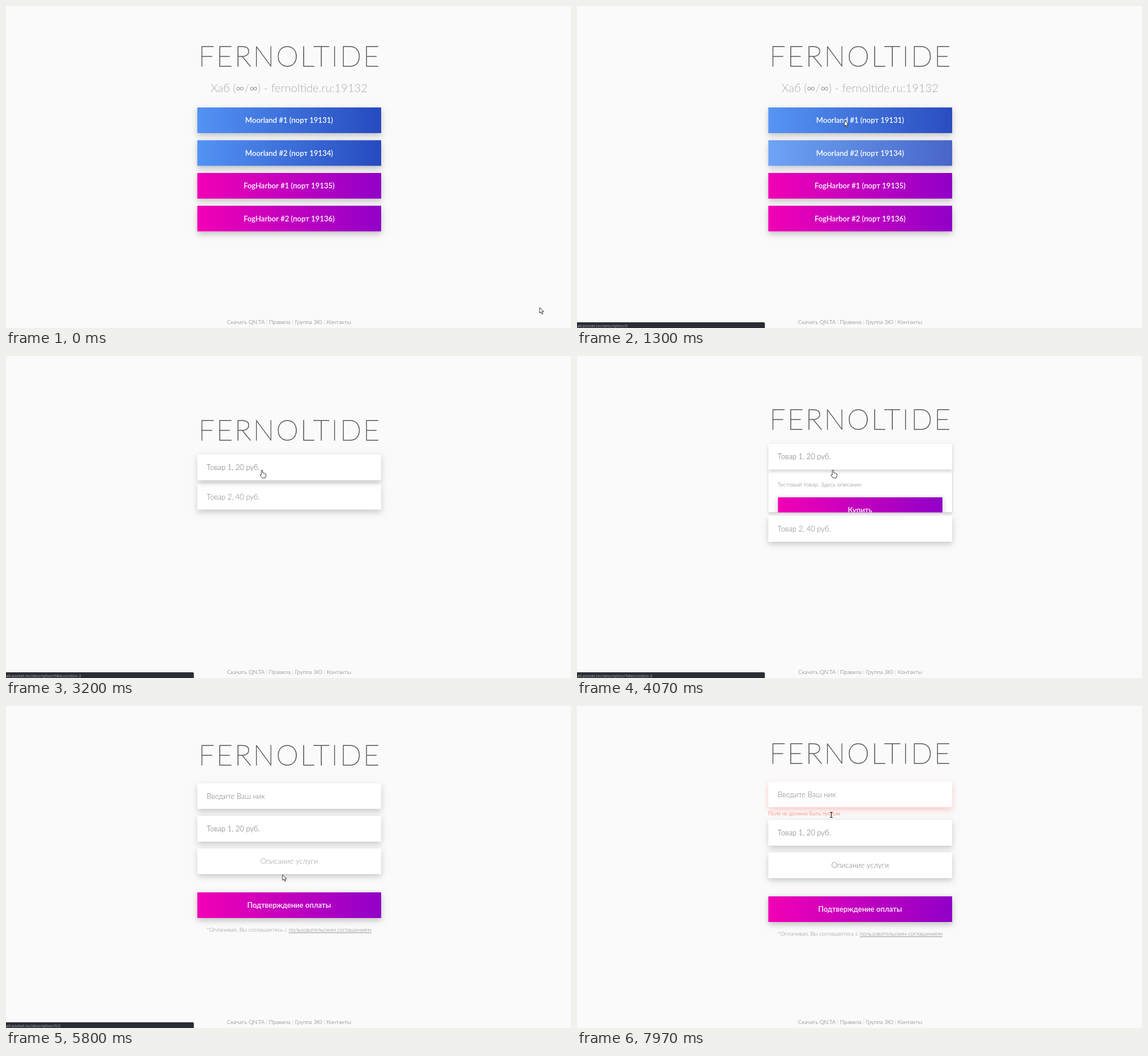
These frames come from a looping animation (991x565 px, 8 s). An HTML page with a canvas:

```html
<!DOCTYPE html>
<html lang="ru">
<head>
<meta charset="utf-8">
<style>
html, body { margin: 0; width: 100%; height: 100%; overflow: hidden; background: #fafafa; }
canvas { display: block; width: 991px; height: 565px; }
</style>
</head>
<body>
<canvas id="stage" width="991" height="565"></canvas>
<script>
const ctx = document.getElementById('stage').getContext('2d');
const LOOP = 8000, LEFT = 335.5, WIDTH = 322.5, HEIGHT = 45, MID = 496.5;
const FONT = "Lato, 'Open Sans', sans-serif";
const BLUE = ['#5393f4', '#264abf'], PINK = ['#f200b5', '#9100c8'];
const BRAND = 'FERNOLTIDE';

const clamp = v => Math.max(0, Math.min(1, v));
const smooth = v => v * v * (3 - 2 * v);
const ramp = (t, start, length) => clamp((t - start) / length);

// Each span is [enter, leave]; the highlight fades both ways.
const hover = (t, spans) =>
  spans.reduce((sum, [a, b]) => sum + ramp(t, a, 260) - ramp(t, b, 260), 0);

function text(str, x, y, size, color, weight = 300, align = 'left') {
  ctx.font = `${weight} ${size}px ${FONT}`;
  ctx.textAlign = align;
  ctx.fillStyle = color;
  ctx.fillText(str, x, y);
}

function runs(parts, y, size) {
  ctx.font = `300 ${size}px ${FONT}`;
  const widths = parts.map(p => ctx.measureText(p[0]).width);
  let x = MID - widths.reduce((a, b) => a + b) / 2;
  parts.forEach(([str, color, underline], i) => {
    text(str, x, y, size, color);
    if (underline) ctx.fillRect(x, y + 1.5, widths[i], 0.8);
    x += widths[i];
  });
}

function box(x, y, w, h, fill, shadow, blur = 10, drop = 4) {
  ctx.save();
  ctx.shadowColor = shadow;
  ctx.shadowBlur = blur;
  ctx.shadowOffsetY = drop;
  ctx.fillStyle = fill;
  ctx.fillRect(x, y, w, h);
  ctx.restore();
}

function button(label, y, colors, lit, x = LEFT, w = WIDTH) {
  const fill = ctx.createLinearGradient(x, y, x + w, y);
  colors.forEach((c, i) => fill.addColorStop(i, c));
  box(x, y, w, HEIGHT, '#fafafa', `rgba(0,0,0,${0.24 - 0.05 * lit})`);
  ctx.globalAlpha = 1 - 0.18 * lit;
  ctx.fillStyle = fill;
  ctx.fillRect(x, y, w, HEIGHT);
  ctx.globalAlpha = 1;
  text(label, MID, y + 27, 13, '#fff', 600, 'center');
}

function card(label, y, { center = false, color = '#777', shadow = 'rgba(0,0,0,.2)', blur, drop } = {}) {
  box(LEFT, y, WIDTH, HEIGHT, '#fff', shadow, blur, drop);
  text(label, center ? MID : 352, y + 27, 13, color, 300, center ? 'center' : 'left');
}

function title(baseline) {
  ctx.letterSpacing = '3px';
  text(BRAND, MID + 1.5, baseline, 50, '#555', 100, 'center');
  ctx.strokeStyle = '#555';
  ctx.lineWidth = 0.8;
  ctx.strokeText(BRAND, MID + 1.5, baseline);
  ctx.letterSpacing = '0px';
}

function hub(t) {
  title(106);
  runs([['Хаб (', '#aaa'], ['∞', '#777'], ['/', '#aaa'], ['∞', '#777'],
    [`) - ${BRAND.toLowerCase()}.ru:19132`, '#aaa']], 151, 20);
  button('Moorland #1 (порт 19131)', 178, BLUE, hover(t, [[1275, 1720]]));
  button('Moorland #2 (порт 19134)', 235.5, BLUE, hover(t, [[700, 1270], [1740, 2010]]));
  button('FogHarbor #1 (порт 19135)', 293, PINK, hover(t, [[540, 680], [2040, 2260]]));
  button('FogHarbor #2 (порт 19136)', 350.5, PINK, hover(t, [[430, 520], [2280, 9000]]));
}

function shop(t) {
  const open = smooth(ramp(t, 3800, 430));
  const top = 173 - 27 * open;
  title(top - 25.5);
  const panel = 109 * open;
  if (open > 0) {
    box(LEFT, top + HEIGHT, WIDTH, panel, '#fff', 'rgba(0,0,0,.25)', 4, 2);
    ctx.save();
    ctx.beginPath();
    ctx.rect(LEFT, top + HEIGHT, WIDTH, panel);
    ctx.clip();
    text('Тестовый товар. Здесь описание', 352, top + 75, 10, '#777');
    button('Купить', top + 93.5, PINK, hover(t, [[4490, 9000]]), 352.5, 288.5);
    ctx.restore();
  }
  card('Товар 2, 40 руб.', top + 51.5 + panel);
  card('Товар 1, 20 руб.', top, { color: '#666', blur: 10 - 6 * open, drop: 4 - 2 * open });
}

function form(t) {
  const error = t >= 6800;
  const up = error ? 3 : 0, down = error ? 7 : 0;
  const red = ramp(t, 6870, 230);
  const tint = `rgba(${Math.round(255 * red)},${Math.round(60 * red)},${Math.round(60 * red)},${0.2 + 0.07 * red})`;
  title(103.5 - up);
  card('Введите Ваш ник', 135.5 - up, { shadow: tint });
  if (error) text('Поле не должно быть пустым', 335.5, 192, 9.2, '#f4593f');
  card('Товар 1, 20 руб.', 193 + down, { color: '#666' });
  card('Описание услуги', 250 + down, {
    center: true, color: hover(t, [[5230, 5850]]) > 0.5 ? '#999' : '#777'
  });
  button('Подтверждение оплаты', 327 + down, PINK, hover(t, [[6340, 7380]]));
  runs([['*Оплачивая, Вы соглашаетесь с ', '#888'],
    ['пользовательским соглашением', '#777', true]], 396 + down, 9.9);
}

function footer() {
  const bar = [' | ', '#bbb'];
  runs([['Скачать QN.TA', '#666'], bar, ['Правила', '#666'], bar,
    ['Группа ЗЮ', '#666'], bar, ['Контакты', '#666']], 557.5, 9.8);
}

const links = [
  [430, 'description/9'], [540, 'description/8'], [700, 'description/7'],
  [1272, 'description/6'], [1730, 'description/7'], [2040, 'description/8'],
  [2280, 'description/9'], [2640, ''], [3050, 'description/9#accordion-3'],
  [4400, ''], [4500, 'buy/9/2'], [5530, 'description/9/2'], [5900, '']
];

function statusBar(t) {
  const link = links.filter(l => l[0] <= t).pop();
  if (!link || !link[1]) return;
  ctx.fillStyle = '#2b2d35';
  ctx.beginPath();
  ctx.roundRect(-2, 555, 331.5, 14, 2);
  ctx.fill();
  ctx.font = "7px 'Open Sans', sans-serif";
  ctx.textAlign = 'left';
  ctx.fillStyle = '#a5a7ad';
  ctx.fillText('all-pocket.loc/' + link[1], 0.5, 564);
}

// Pointer stops: [time, x, y]
const stops = [
  [70, 936, 529], [470, 640, 380], [720, 520, 272], [900, 490, 256], [1180, 473, 246],
  [1300, 469, 201], [1550, 467, 197], [1720, 466, 226], [2020, 468, 290],
  [2280, 471, 350], [2500, 472, 368], [2650, 472, 368], [3150, 449, 201],
  [4370, 449, 201], [4560, 484, 266], [5530, 484, 266], [5800, 485, 296],
  [6060, 575, 388], [6330, 552, 346], [7270, 552, 346], [7850, 446, 191]
];

function pointerAt(t) {
  const next = stops.findIndex(s => s[0] > t);
  if (next < 0) return stops[stops.length - 1].slice(1);
  if (next === 0) return stops[0].slice(1);
  const [t0, x0, y0] = stops[next - 1], [t1, x1, y1] = stops[next];
  const k = smooth((t - t0) / (t1 - t0));
  return [x0 + (x1 - x0) * k, y0 + (y1 - y0) * k];
}

const arrow = new Path2D('M0 0V10L2.4 7.8 4 11.6 5.7 10.9 4.1 7.2H7.2Z');
const hand = new Path2D('M-1.2 5.8V-.2Q0-1.6 1.2-.2V4L4.7 4.8 7 6V9.2L5.7 13H.3L-3.3 8.5Q-3.8 6.3-1.2 7.7Z');

function pointer(t) {
  const [x, y] = pointerAt(t);
  ctx.save();
  ctx.translate(x, y);
  ctx.strokeStyle = '#222';
  ctx.lineWidth = 0.9;
  if (t > 7270 && y < 250) {
    ctx.beginPath();
    ctx.moveTo(-2.5, -4.5); ctx.lineTo(2.5, -4.5);
    ctx.moveTo(0, -4.5); ctx.lineTo(0, 4.5);
    ctx.moveTo(-2.5, 4.5); ctx.lineTo(2.5, 4.5);
    ctx.lineWidth = 1.2;
    ctx.stroke();
  } else {
    const shape = t >= 3050 && t < 4400 ? hand : arrow;
    ctx.fillStyle = '#fff';
    ctx.fill(shape);
    ctx.stroke(shape);
  }
  ctx.restore();
}

function draw(now) {
  const t = now % LOOP;
  ctx.fillStyle = '#fafafa';
  ctx.fillRect(0, 0, 991, 565);
  (t < 2600 ? hub : t < 5200 ? shop : form)(t);
  footer();
  statusBar(t);
  pointer(t);
}

let start;
function frame(now) {
  start ??= now;
  draw(now - start);
  requestAnimationFrame(frame);
}
draw(0);
requestAnimationFrame(frame);
</script>
</body>
</html>
```
